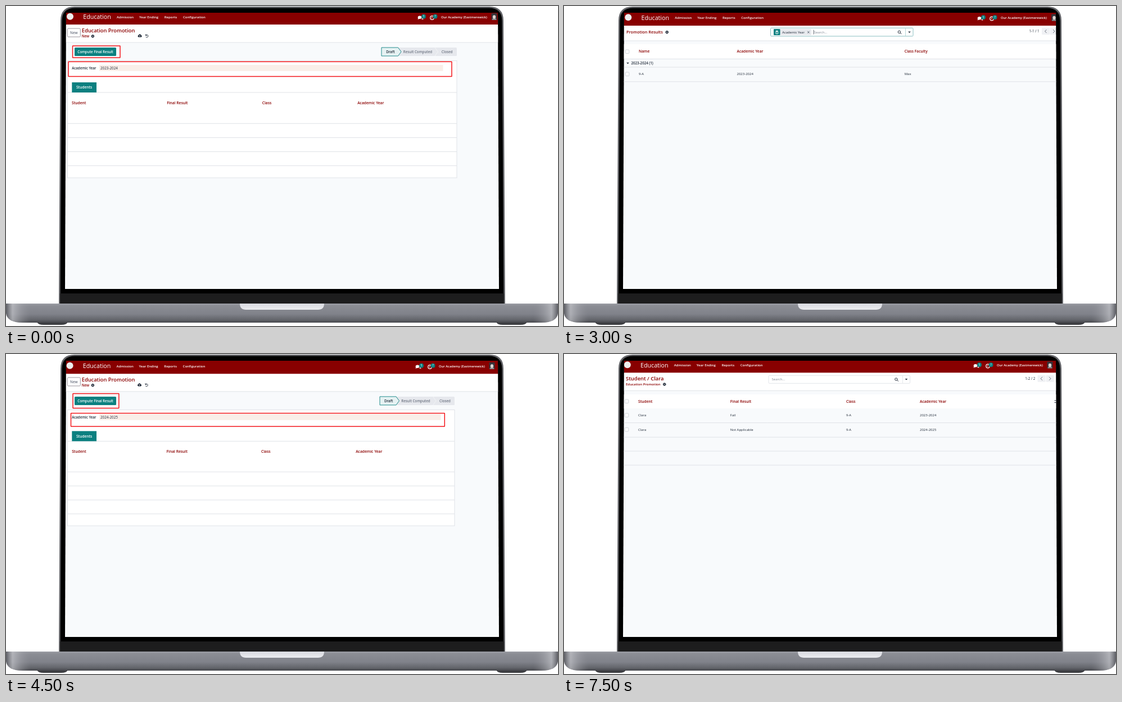
Recreate the animation shown at these times as an HTML page. Size 982x570 px, loop 8 s.

```html
<!DOCTYPE html>
<html lang="en">
<head>
<meta charset="utf-8">
<title>Education promotion walkthrough</title>
<style>
  html, body { margin: 0; width: 100%; height: 100%; overflow: hidden; background: #fff; }
  svg { display: block; width: 982px; height: 570px; }
  text { font-family: "Open Sans", "Noto Sans", sans-serif; fill: #1f2937; white-space: pre; }
  .brand { fill: #fff; }
  .nav, .white { fill: #fff; font-weight: 600; }
  .head { fill: #8b0000; font-weight: 600; }
  .bold { fill: #1f2937; font-weight: 600; }
  .muted { fill: #4f5866; }
  .step { fill: #6b7280; font-weight: 600; }
  .link { fill: #0f8a8a; font-weight: 600; }
  .struck { fill: #8b0000; text-decoration: line-through; }
  .hint { fill: #7f8793; }
</style>
</head>
<body>
<svg viewBox="0 0 982 570" xmlns="http://www.w3.org/2000/svg">
  <defs>
    <linearGradient id="metal" x2="0" y2="1">
      <stop offset="0" stop-color="#9c9ea5"/>
      <stop offset=".12" stop-color="#8b8d94"/>
      <stop offset=".55" stop-color="#80828a"/>
      <stop offset=".85" stop-color="#63656b"/>
      <stop offset="1" stop-color="#46474c"/>
    </linearGradient>
    <linearGradient id="ends">
      <stop offset="0" stop-color="#505157" stop-opacity=".8"/>
      <stop offset=".012" stop-color="#c6c7cc" stop-opacity=".65"/>
      <stop offset=".045" stop-color="#92939a" stop-opacity="0"/>
      <stop offset=".955" stop-color="#92939a" stop-opacity="0"/>
      <stop offset=".988" stop-color="#c6c7cc" stop-opacity=".65"/>
      <stop offset="1" stop-color="#505157" stop-opacity=".8"/>
    </linearGradient>
    <linearGradient id="notch" x2="0" y2="1">
      <stop offset="0" stop-color="#d9dae0"/>
      <stop offset="1" stop-color="#eaebef"/>
    </linearGradient>
    <clipPath id="screen"><path d="M107 12H875L877 504H105Z"/></clipPath>
    <path id="base" d="M0 530H982V547Q980 564 952 564H30Q2 564 0 547Z"/>
  </defs>
  <path d="M94 531 97 26Q97 1 122 1H860Q885 1 885 26L888 531Z" fill="#636468"/>
  <path d="M96.500 531 99.500 27Q99.500 3.500 123 3.500H859Q882.500 3.500 882.500 27L885.500 531Z" fill="#000"/>
  <path d="M96 512H886V530H96Z" fill="#1d1d1e"/>
  <path d="M55 563H110Q108 568 98 568H67Q57 568 55 563ZM872 563H927Q925 568 915 568H884Q874 568 872 563Z" fill="#3d3e42"/>
  <use href="#base" fill="url(#metal)"/>
  <use href="#base" fill="url(#ends)"/>
  <path d="M416 530H566Q566 541 555 541H427Q416 541 416 530Z" fill="url(#notch)"/>
  <g id="stage" clip-path="url(#screen)">
    <path d="M105 12H877V504H105Z" fill="#f8fafc"/>
  </g>
</svg>
<script>
const TEAL = '#0b8080', RED = '#880000', RULE = '#dfe2e7';

// Text is placed by its left edge and the middle of its capitals.
const text = (x, cy, s, cls = '', size = 6.1, anchor = 'start') =>
  `<text x="${x}" y="${cy + size * 0.36}" class="${cls}" font-size="${size}" text-anchor="${anchor}">${s}</text>`;
const box = (l, t, r, b, fill, stroke = 'none', radius = 0, width = 1) =>
  `<rect x="${l}" y="${t}" width="${r - l}" height="${b - t}" rx="${radius}" fill="${fill}" stroke="${stroke}" stroke-width="${width}"/>`;
const line = (d, color, width = 1) =>
  `<path d="${d}" fill="none" stroke="${color}" stroke-width="${width}"/>`;
const shape = (d, fill) => `<path d="${d}" fill="${fill}"/>`;
const dot = (x, y, r, fill) => `<circle cx="${x}" cy="${y}" r="${r}" fill="${fill}"/>`;
const rules = (l, r, ys) => ys.map(y => line(`M${l} ${y}H${r}`, RULE)).join('');
const cells = (xs, cy, words, cls, size) =>
  words.map((word, i) => text(xs[i], cy, word, cls, size)).join('');
const outline = (l, t, r, b) => box(l, t, r, b, 'none', '#f3161b', 0.5, 1.5);

const gear = (x, y) =>
  `<circle cx="${x}" cy="${y}" r="2.5" fill="none" stroke="#1f2937" stroke-width="1" stroke-dasharray="1.1 .86"/>` +
  `<circle cx="${x}" cy="${y}" r="1.6" fill="none" stroke="#1f2937" stroke-width="1.5"/>`;
const saveIcons = (x, y) =>
  shape(`M${x - 2} ${y + 2.4}a1.9 1.9 0 0 1 -.3 -3.6a2.4 2.4 0 0 1 4.5 -.2a2 2 0 0 1 .1 3.800Z`, '#1f2937') +
  line(`M${x} ${y + 1.6}v-2.400m-1.100 1l1.100 -1.100l1.100 1.100`, '#fff', 0.7) +
  line(`M${x + 11} ${y - 1.4}a2.300 2.300 0 1 1 -.3 3.100M${x + 10.500} ${y - 2.800}v2.100h2.100`, '#1f2937', 0.9);
const trash = (x, y) =>
  box(x - 1.7, y - 1.2, x + 1.7, y + 2.6, 'none', '#374151', 0.4, 0.9) +
  line(`M${x - 2.5} ${y - 1.600}h5M${x - 1} ${y - 2.400}h2M${x} ${y - 0.500}v2.400`, '#374151', 0.8);
const checkbox = (x, y) => box(x, y, x + 6.5, y + 6.5, '#fff', '#c6cbd2', 1, 0.8);
const caretDown = (x, y) => shape(`M${x - 2.3} ${y - 1.2}h4.600l-2.300 2.500Z`, '#1f2937');
const magnifier = (x, y) =>
  line(`M${x + 1.2} ${y + 1}l2.200 2.200M${x + 1.600} ${y - 0.500}a2.200 2.200 0 1 1 -4.400 0a2.200 2.200 0 1 1 4.400 0`, '#1f2937', 1);

function navBar({ cy, bottom, dx, company, avatar }) {
  const chat = company - 37, clock = company - 16;
  return box(105, 11, 877, bottom, RED) +
    dot(114 + dx, cy - 0.7, 6, '#eeeeee') +
    text(137.2 + dx, cy - 0.3, 'Education', 'brand', 10.7) +
    cells([197, 237, 281.7, 315].map(x => x + dx), cy,
      ['Admission', 'Year Ending', 'Reports', 'Configuration'], 'nav', 6) +
    `<ellipse cx="${chat - 1}" cy="${cy + 0.8}" rx="3.300" ry="2.700" fill="#fff"/>` +
    shape(`M${chat - 4} ${cy + 2}l-.3 2.500l3 -1.500ZM${chat + 1} ${cy + 3.500}q3 0 3.500 -2.500l1 3.700Z`, '#fff') +
    `<circle cx="${clock}" cy="${cy + 1.5}" r="3.300" fill="none" stroke="#fff" stroke-width="1.200"/>` +
    line(`M${clock} ${cy - 0.400}v2.200h-1.500`, '#fff', 0.8) +
    [[chat + 6, 5], [clock + 5.5, 7]].map(([x, n]) =>
      dot(x, cy - 0.8, 3.9, TEAL) + text(x, cy - 0.8, n, 'brand', 4.5, 'middle')).join('') +
    text(company, cy, 'Our Academy (Eastmerewick)', 'nav', 5.8) +
    box(avatar - 5, cy - 6.5, avatar + 5, cy + 5.5, '#35343b', 'none', 1) +
    shape(`M${avatar - 4} ${cy + 5.500}q0 -3.500 4 -3.500t4 3.500Z`, '#8e8c90') +
    `<ellipse cx="${avatar}" cy="${cy}" rx="2.700" ry="3.300" fill="#ddd3cf"/>`;
}

const header = (top, bottom) => box(105, top, 877, bottom, '#fff') + rules(105, 877, [bottom]);

function pager(x, cy, label, left, right) {
  const arrow = (px, dir) => box(px - 7, cy - 6, px + 7, cy + 6, '#f0f1f4', 'none', 1) +
    line(`M${px - dir * 1.500} ${cy - 3}l${dir * 3} 3l${-dir * 3} 3`, '#4b5563', 0.8);
  return text(x, cy, label, '', 6.2) + arrow(left, -1) + arrow(right, 1);
}

function newButton(x, cy) {
  return box(x, cy - 7.5, x + 23, cy + 7.5, '#fff', '#8f8891', 1.5, 0.9) +
    text(x + 11.5, cy, 'New', 'step', 6.3, 'middle');
}

const button = (l, t, r, label, fill) =>
  box(l, t, r, t + 15, fill, 'none', 1.5) + text((l + r) / 2, t + 7.5, label, 'white', 6.2, 'middle');

function statusBar(edges, top, active) {
  const labels = ['Draft', 'Result Computed', 'Closed'], mid = top + 7.5, end = top + 15;
  const [first, , , last] = edges;
  const a = edges[active], b = edges[active + 1];
  const notch = active ? `L${a + 5.5} ${mid}` : '';
  const divider = active ? '' :
    line(`M${edges[2]} ${top}l5.500 7.500l-5.500 7.500`, '#f3f5f7', 0.9);
  return box(first, top, last, end, '#e6e8ed', 'none', 1.5) + divider +
    `<path d="M${a} ${top}H${b}L${b + 5.5} ${mid}L${b} ${end}H${a}${notch}Z" fill="#e6f2f3" stroke="${TEAL}" stroke-width=".9" stroke-linejoin="round"/>` +
    labels.map((label, i) => text((edges[i] + edges[i + 1]) / 2 + (i ? 2.2 : 1.2), mid, label,
      i === active ? 'bold' : 'step', 6.2, 'middle')).join('');
}

const sheet = (l, t, r, b) => box(l, t, r, b, '#fff', RULE);
const tab = (l, t, r, right) => rules(l - 8, right, [t + 18]) +
  box(l, t, r, t + 18, TEAL) + text((l + r) / 2, t + 9, 'Students', 'white', 6.6, 'middle');
const field = (l, t, r, b) => box(l, t, r, b, '#f9eee8');

// Empty promotion form; the two visits differ by small offsets.
function draftForm({ y, x, right, bar, year, columns, frames, fieldEnd, lines, nav }) {
  return navBar(nav) + header(nav.bottom, 65 + y) +
    newButton(109.3, 47.5 + y) +
    text(134.7, 43.8 + y, 'Education Promotion', 'head', 9.3) +
    text(134.7, 53.8 + y, 'New', 'head', 6.2) + gear(154.3, 53.8 + y) +
    saveIcons(238 + x, 53.2 + y) +
    button(122, 74 + y, 196, 'Compute Final Result', TEAL) +
    statusBar(bar, 74 + y, 0) +
    sheet(109.5, 97.5 + y, right, 306) +
    field(166, 105 + y, fieldEnd, 115.8 + y) +
    text(117.2, 110.6 + y, 'Academic Year', 'bold', 6.15) +
    text(168, 110.8 + y, year, '', 6.3) +
    tab(117.3, 136 + y * 0.7, 161, right) +
    cells(columns, 172.8 + y * 0.5, ['Student', 'Final Result', 'Class', 'Academic Year'], 'head', 6.7) +
    rules(109.5, right, lines) + frames.map(f => outline(...f)).join('');
}

function computedForm() {
  const columns = [118, 267, 455.3, 574.5];
  const row = (cy, name, result) =>
    cells(columns, cy, [name, result, '9-A', '2023-2024'], '', 6) + trash(794.3, cy + 0.7);
  return navBar({ cy: 22, bottom: 36, dx: 0.7, company: 771, avatar: 866 }) + header(36, 67.5) +
    newButton(110.3, 50) +
    text(136, 46.2, 'Education Promotion', 'head', 9.25) +
    text(136, 56.2, '2023-2024', 'head', 6.2) + gear(173, 56.2) +
    pager(827.5, 46, '1 / 1', 851, 866) +
    button(123, 76, 195, 'Close Academic Year', '#5b3a57') +
    statusBar([667, 695, 762, 799], 76, 1) +
    sheet(110.5, 99.7, 799, 307) +
    text(118.3, 112.7, 'Academic Year', 'muted', 6.3) + text(168, 112.9, '2023-2024', 'link', 6.2) +
    tab(118.3, 137.8, 162, 799) +
    cells(columns, 174.5, ['Student', 'Final Result', 'Class', 'Academic Year'], 'head', 6.7) +
    row(199, 'Theo', 'Pass') + row(223.8, 'Clara', 'Fail') +
    rules(110.5, 799, [211, 236, 261, 286]);
}

function resultList() {
  const columns = [133, 307.5, 605.7];
  return navBar({ cy: 21, bottom: 35, dx: 0.3, company: 777, avatar: 872 }) + header(35, 62) +
    text(111, 46.7, 'Promotion Results', 'head', 7.3) + gear(183.2, 46.7) +
    box(367.5, 39.2, 621, 53.8, '#fff', '#7fb9bb', 1.5, 0.9) + line('M607.500 39.500V53.500', '#a9cfd0', 0.8) +
    box(373, 41, 440, 52, '#e8eaee', 'none', 1) + box(373, 41, 384.5, 52, TEAL, 'none', 1) +
    shape('M375.800 45l3 -1.600l3 1.600l-3 1.600Z', '#fff') +
    line('M375.800 46.800l3 1.500l3 -1.500M375.800 48.500l3 1.500l3 -1.500', '#fff', 0.8) +
    text(388.3, 46.7, 'Academic Year', '', 5.85) +
    line('M433.200 45l3.400 3.400m0 -3.400l-3.400 3.400', '#374151', 0.8) +
    line('M444.200 42.500V50.500', '#1f2937', 0.7) + text(445, 46.7, 'Search...', 'hint', 5.9) +
    magnifier(597, 46.8) + caretDown(614.5, 46.7) +
    pager(827.5, 45, '1-1 / 1', 857, 871.5) +
    box(105, 68, 877, 94, '#fff') + checkbox(109.3, 78) +
    cells(columns, 81, ['Name', 'Academic Year', 'Class Faculty'], 'head', 6.65) +
    rules(105, 877, [94.3, 109, 134.8]) +
    caretDown(113.5, 102) + text(119.5, 102, '2023-2024 (1)', 'bold', 6.2) +
    checkbox(109.3, 118) + cells(columns, 121.2, ['9-A', '2023-2024', 'Max'], '', 6);
}

function resultForm() {
  return navBar({ cy: 20.5, bottom: 34.5, dx: -1.9, company: 769.5, avatar: 864.5 }) + header(34.5, 66) +
    text(109.3, 44.5, 'Promotion Results', 'head', 9.4) +
    text(109.5, 54.6, '9-A', 'struck', 6.2) + gear(125.7, 54.6) + saveIcons(201, 54) +
    pager(826, 44.2, '1 / 2', 849, 864.5) +
    sheet(106.5, 70, 797.5, 314.5) +
    text(115.3, 83, 'Name', 'muted', 6.2) + text(134.8, 80.8, '?', 'link', 4.6) + text(180, 83, '9-A') +
    text(115.3, 98.6, 'Promotion Class', 'bold') + text(115.3, 115.2, 'Promotion Division', 'bold') +
    field(514, 77.5, 773.5, 88.5) + field(514, 94.7, 773.5, 105) +
    text(460, 83, 'Academic Year', 'bold', 6.15) + text(505.3, 80.8, '?', 'link', 4.6) +
    text(516.5, 83.2, '2024-2025', '', 6.3) +
    text(460, 99.8, 'Class Faculty', 'bold') + text(500, 97.8, '?', 'link', 4.6) +
    text(516.5, 100.2, 'Max', '', 6.2) +
    outline(455.5, 73, 583.5, 92.5) +
    tab(115.5, 144.8, 159, 797.5) +
    cells([115.3, 414.3], 181.3, ['Student', 'Final Result'], 'head', 6.7) +
    cells([115.3, 414.3], 206, ['Clara', 'Not Applicable'], '', 5.95) + trash(792.5, 206.5) +
    line('M115.500 227V235', '#1f2937', 0.7) + text(115.8, 231.2, 'Add a line', 'link', 6) +
    rules(106.5, 797.5, [218, 243, 267.5, 292.5]);
}

function studentList() {
  const columns = [132, 295.8, 502, 633];
  const row = (cy, result, year) => checkbox(108.3, cy - 3.5) +
    cells(columns, cy, ['Clara', result, '9-A', year], '', 6);
  return navBar({ cy: 20, bottom: 33.5, dx: -1.2, company: 770, avatar: 864.5 }) + header(33.5, 65.3) +
    text(110, 44, 'Student / Clara', 'head', 9.4) +
    text(110, 54, 'Education Promotion', 'head', 6.05) + gear(178.7, 54) +
    box(364, 38.3, 615.5, 52.3, '#fff', RULE, 1.5, 0.9) + line('M602.500 38.500V52', RULE, 0.8) +
    text(369.5, 45.3, 'Search...', 'hint', 6) + magnifier(591.5, 45.5) + caretDown(609, 45.3) +
    pager(820.3, 43.8, '1-2 / 2', 849.5, 864.5) +
    box(105, 72, 877, 97, '#fff') + checkbox(108.3, 81) +
    cells(columns, 84.5, ['Student', 'Final Result', 'Class', 'Academic Year'], 'head', 6.7) +
    line('M872.500 83H877M872.500 86.500H877', '#1f2937', 1) +
    row(109.3, 'Fail', '2023-2024') + row(134.8, 'Not Applicable', '2024-2025') +
    rules(105, 877, [122.5, 148.2, 173, 198]);
}

const LOOP = 8000;
const scenes = [
  [0, draftForm({
    y: 0, x: 0, right: 802, bar: [668, 697.5, 763, 802], year: '2023-2024',
    columns: [117, 286.2, 455.7, 625.2], fieldEnd: 777.5, lines: [209.3, 234.5, 259.5, 284.5],
    frames: [[118.5, 71, 203, 92], [111, 99.3, 793, 125.5]],
    nav: { cy: 19.5, bottom: 33, dx: 0, company: 774, avatar: 868.5 }
  })],
  [1500, computedForm()],
  [3000, resultList()],
  [4500, draftForm({
    y: 1.9, x: -0.6, right: 798, bar: [665, 694, 759.5, 798], year: '2024-2025',
    columns: [117.2, 285.5, 454, 622.2], fieldEnd: 773.5, lines: [210, 235, 260, 284.8],
    frames: [[119, 70.5, 200.8, 96.5], [115.5, 105.5, 780.3, 129]],
    nav: { cy: 21.5, bottom: 35.5, dx: -0.4, company: 770, avatar: 864.5 }
  })],
  [6000, resultForm()],
  [7500, studentList()]
];

const stage = document.getElementById('stage');
scenes.forEach(([start, markup], i) => {
  const end = i + 1 < scenes.length ? scenes[i + 1][0] : LOOP;
  const group = document.createElementNS('http://www.w3.org/2000/svg', 'g');
  group.innerHTML = markup;
  stage.append(group);
  const key = (ms, opacity) => ({ offset: ms / LOOP, opacity, easing: 'step-end' });
  const steps = [key(start, 1), key(end, 0)];
  if (start > 0) steps.unshift(key(0, 0));
  if (end < LOOP) steps.push(key(LOOP, 0));
  group.style.opacity = start > 0 ? 0 : 1;
  group.animate(steps, { duration: LOOP, iterations: Infinity });
});
</script>
</body>
</html>
```
